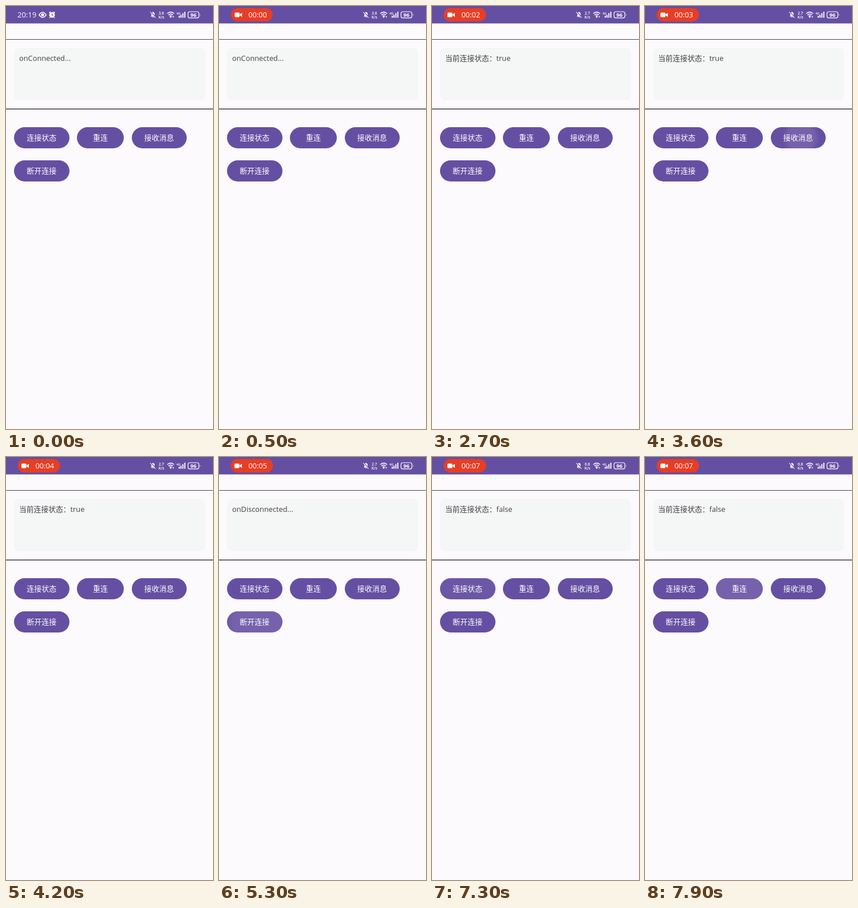
These frames come from a looping animation (362 px wide and 740 px high, 8 s). An HTML page:

```html
<!DOCTYPE html>
<html lang="zh-CN">
<head>
<meta charset="utf-8">
<style>
html, body { margin: 0; width: 100%; height: 100%; overflow: hidden; background: #fdfafd; }
body, svg text { font-family: "Open Sans", "Noto Sans CJK SC", "Noto Sans CJK", sans-serif; }
svg { position: absolute; left: 0; top: 0; }
.btn {
  position: absolute; height: 37px; border-radius: 19px;
  background-color: #654fa2; color: #fff;
  font-size: 13px; font-weight: 500; line-height: 37px; text-align: center; white-space: nowrap;
}
</style>
</head>
<body>
<svg width="362" height="740" viewBox="0 0 362 740">
  <rect width="362" height="30.5" fill="#654fa2"/>
  <path d="M0 58.5H362" stroke="#4b494d" stroke-width="1.2"/>
  <path d="M0 180.2H362" stroke="#3c3a3f" stroke-width="1.5"/>
  <rect x="14" y="73" width="334" height="92" rx="9" fill="#f5f6f6"/>
  <text id="message" x="23" y="96.3" font-size="12.8" fill="#424145"></text>

  <g id="clock" fill="#fff">
    <text x="20" y="20.3" font-size="13" font-weight="500">20:19</text>
    <path d="M57.8 15.5Q64 6.500 70.200 15.500Q64 24.500 57.800 15.500Z" fill="none" stroke="#fff" stroke-width="1.5"/>
    <circle cx="64" cy="15.500" r="2.700"/>
    <circle cx="80.500" cy="15.700" r="4.900"/>
    <path d="M75.500 12.200L78 10.200M85.500 12.200L83 10.200M77 20L76 21M84 20L85 21" stroke="#fff" stroke-width="1.500"/>
    <path d="M80.500 12.700V16L82.700 17.300" fill="none" stroke="#654fa2" stroke-width="1.200"/>
  </g>

  <g id="pill" fill="#fff">
    <rect x="20.500" y="3.500" width="74" height="23.500" rx="11.750" fill="#e73e25"/>
    <rect x="27" y="11.500" width="8.600" height="8" rx="1.500"/>
    <path d="M36 14.500L40 12V19L36 16.500Z"/>
    <text id="timer" x="51.500" y="20.300" font-size="12.800" font-weight="500"></text>
  </g>

  <g fill="#fff">
    <path d="M253 18.600L254.300 17V14Q254.300 11.300 256.200 10.800Q257 9.500 257.800 10.800Q259.900 11.300 259.900 14V17L261.200 18.600ZM255.800 19.200H258.400Q257.100 21.200 255.800 19.200Z"/>
    <path d="M252.800 10.200L262 20.300" stroke="#654fa2" stroke-width="2.200"/>
    <path d="M252.200 10.500L261.400 20.600" stroke="#fff" stroke-width="1.100"/>
    <g font-size="6.700" font-weight="600" text-anchor="middle">
      <text id="speed" x="271.700" y="14.800"></text>
      <text x="271.700" y="21.500">K/s</text>
    </g>
    <g fill="none" stroke="#fff" stroke-width="1.500">
      <path d="M282 13.300Q288 8 294 13.300M284 15.700Q288 12.200 292 15.700M286 18Q288 16.200 290 18"/>
      <rect x="318.300" y="10" width="19" height="10.800" rx="3" stroke-width="1.200"/>
    </g>
    <circle cx="288" cy="19.400" r="1.200"/>
    <path d="M291 18H294L292.500 20.500Z"/>
    <text x="298" y="14.500" font-size="5.800" font-weight="600">4G</text>
    <path d="M303 20.500V17M306 20.500V15.500M309.300 20.500V12.500M312.700 20.500V10" stroke="#fff" stroke-width="1.900"/>
    <path d="M339 13.500Q340.700 15.400 339 17.300Z"/>
    <text x="327.800" y="18.800" font-size="9.300" font-weight="700" text-anchor="middle">96</text>
  </g>
</svg>
<script>
const $ = id => document.getElementById(id);
const clamp = v => Math.max(0, Math.min(1, v));
const easeOut = v => 1 - (1 - clamp(v)) ** 3;

const makeButton = (label, x, y, w) => {
  const el = document.createElement("div");
  el.className = "btn";
  el.textContent = label;
  el.style.cssText = `left:${x}px;top:${y}px;width:${w}px`;
  document.body.append(el);
  return el;
};
const status = makeButton("连接状态", 14, 211.7, 96.5);
const reconnect = makeButton("重连", 124.3, 211.7, 81.5);
const receive = makeButton("接收消息", 219.5, 211.7, 96.5);
const disconnect = makeButton("断开连接", 14, 269.8, 96.5);
const buttons = [status, reconnect, receive, disconnect];

// button, press time, touch x inside the button
const presses = [
  [status, 1850, 36], [receive, 3550, 53], [disconnect, 5150, 52],
  [status, 6750, 44], [reconnect, 7750, 37]
];
const messages = [
  [0, "onConnected..."], [1900, "当前连接状态：true"],
  [5200, "onDisconnected..."], [6700, "当前连接状态：false"]
];
const speeds = [[0, "3.6"], [2600, "2.7"], [5600, "6.8"]];
const latest = (list, t) => list.filter(([at]) => at <= t).pop()[1];

function setText(id, text) {
  if ($(id).textContent !== text) $(id).textContent = text;
}

function draw(t) {
  setText("message", latest(messages, t));
  setText("speed", latest(speeds, t));
  setText("timer", "00:0" + Math.max(0, Math.floor((t - 200) / 1000)));

  $("clock").setAttribute("opacity", 1 - clamp((t - 50) / 120));
  const scale = 0.5 + 0.5 * easeOut((t - 80) / 620);
  $("pill").setAttribute("opacity", clamp((t - 80) / 200));
  $("pill").setAttribute("transform", `translate(57.5 15.2) scale(${scale}) translate(-57.5 -15.2)`);

  for (const b of buttons) b.style.backgroundImage = "none";
  for (const [b, start, x] of presses) {
    const age = t - start;
    if (age < 0 || age > 650) continue;
    const r = 14 + 66 * easeOut(age / 450);
    const alpha = 0.11 * (1 - clamp((age - 400) / 250));
    b.style.backgroundImage =
      `radial-gradient(circle at ${x}px 18px, rgba(255,255,255,${alpha}) ${r * 0.65}px, rgba(255,255,255,0) ${r}px)`;
  }
}

let origin;
function tick(now) {
  origin ??= now;
  draw((now - origin) % 8000);
  requestAnimationFrame(tick);
}
draw(0);
requestAnimationFrame(tick);
</script>
</body>
</html>
```
